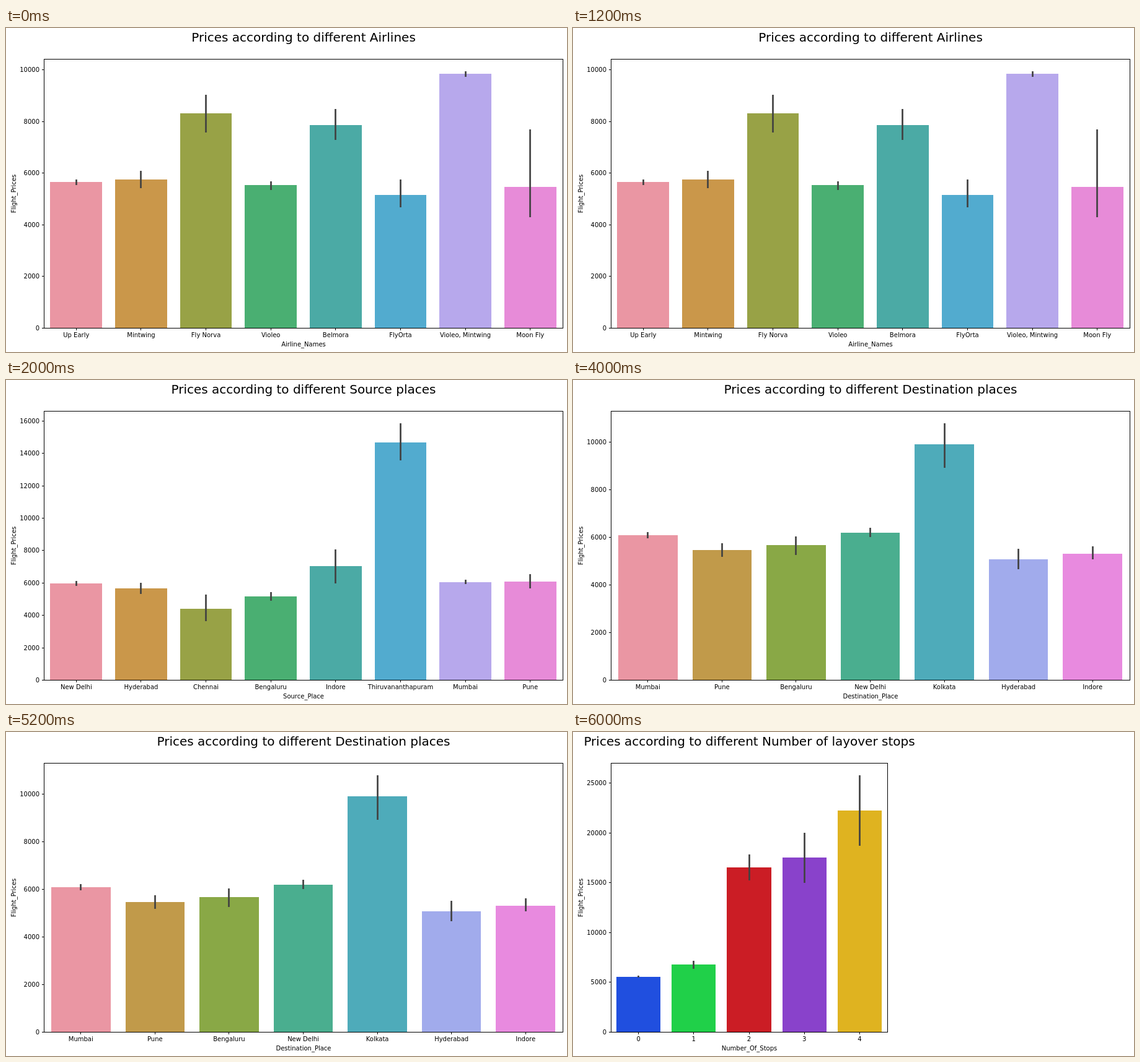
Animation, 905 px wide and 524 px high, one loop 8 s. Source, as an HTML page with a canvas:

```html
<!DOCTYPE html>
<html lang="en">
<head>
<meta charset="utf-8">
<title>Flight prices</title>
<style>
html, body { margin: 0; width: 100%; height: 100%; overflow: hidden; background: #fff; }
canvas { display: block; }
</style>
</head>
<body>
<canvas id="stage" width="905" height="524"></canvas>
<script>
const ctx = document.getElementById('stage').getContext('2d');
const HOLD = 2000, LEFT = 61, TOP = 50, BASE = 485;
const EIGHT = ['#ea96a3', '#ca974a', '#98a246', '#4aaf72', '#4baaa5', '#52abcf', '#b7a8ec', '#e78bd8'];

// unit: pixels per price unit; each bar: label, bar top, error bar top and bottom
const charts = [
  { title: 'Airlines', axis: 'Airline_Names', width: 837, step: 2000, max: 10000, unit: 0.04178, colors: EIGHT,
    bars: [['Up Early', 249, 245, 254], ['Mintwing', 245, 231, 259], ['Fly Norva', 138, 108, 169],
      ['Violeo', 254, 248, 262], ['Belmora', 157, 131, 181], ['FlyOrta', 270, 245, 290],
      ['Violeo, Mintwing', 74, 70, 79], ['Moon Fly', 257, 164, 306]] },
  { title: 'Source places', axis: 'Source_Place', width: 837, step: 2000, max: 16000, unit: 0.02619, colors: EIGHT,
    bars: [['New Delhi', 329, 325, 333], ['Hyderabad', 337, 328, 346], ['Chennai', 370, 347, 390],
      ['Bengaluru', 350, 343, 357], ['Indore', 301, 274, 329], ['Thiruvananthapuram', 101, 70, 130],
      ['Mumbai', 327, 323, 330], ['Pune', 326, 314, 337]] },
  { title: 'Destination places', axis: 'Destination_Place', width: 837, step: 2000, max: 10000, unit: 0.0385,
    colors: ['#ea96a3', '#c19a4a', '#89a846', '#4aae8f', '#4eabba', '#a1abec', '#e88adf'],
    bars: [['Mumbai', 251, 246, 256], ['Pune', 275, 264, 286], ['Bengaluru', 267, 253, 283],
      ['New Delhi', 247, 239, 254], ['Kolkata', 104, 70, 142], ['Hyderabad', 290, 273, 306],
      ['Indore', 281, 269, 290]] },
  { title: 'Number of layover stops', axis: 'Number_Of_Stops', width: 446, step: 5000, max: 25000, unit: 0.01612,
    colors: ['#204fdf', '#20d049', '#cb1d25', '#8942cb', '#dfb320'],
    bars: [['0', 396, 394, 397], ['1', 376, 370, 383], ['2', 219, 198, 240],
      ['3', 203, 163, 244], ['4', 127, 70, 184]] }
];

function text(str, x, y, size = 10, align = 'center') {
  ctx.font = `${size}px "DejaVu Sans", sans-serif`;
  ctx.textAlign = align;
  ctx.fillStyle = '#000';
  ctx.fillText(str, x, y);
}

function line(x1, y1, x2, y2, color = '#000', width = 1) {
  ctx.strokeStyle = color;
  ctx.lineWidth = width;
  ctx.beginPath();
  ctx.moveTo(x1, y1);
  ctx.lineTo(x2, y2);
  ctx.stroke();
}

function draw({ title, axis, width, step, max, unit, colors, bars }) {
  ctx.fillStyle = '#fff';
  ctx.fillRect(0, 0, 905, 524);
  const slot = width / bars.length, middle = LEFT + width / 2 + 0.5;

  bars.forEach(([label, top, high, low], i) => {
    const center = LEFT + slot * (i + 0.5);
    const x1 = Math.round(center - slot * 0.4), x2 = Math.round(center + slot * 0.4);
    const mid = Math.floor(center) + 0.5;
    ctx.fillStyle = colors[i];
    ctx.fillRect(x1, top, x2 - x1, BASE - top);
    line(mid, high, mid, low, '#424242', 2.7);
    line(mid, BASE, mid, BASE + 4);
    text(label, center, 500);
  });

  for (let v = 0; v <= max; v += step) {
    const y = Math.round(BASE - v * unit);
    line(LEFT - 3, y + 0.5, LEFT, y + 0.5);
    text(v, 54, y + 4, 10, 'right');
  }

  ctx.strokeStyle = '#000';
  ctx.lineWidth = 1;
  ctx.strokeRect(LEFT + 0.5, TOP + 0.5, width, BASE - TOP);

  text('Prices according to different ' + title, middle, 22, 20);
  text(axis, middle, 515);
  ctx.save();
  ctx.translate(16, 268);
  ctx.rotate(-Math.PI / 2);
  text('Flight_Prices', 0, 0);
  ctx.restore();
}

const start = performance.now();
function tick() {
  const t = performance.now() - start;
  draw(charts[Math.floor(t / HOLD) % charts.length]);
  requestAnimationFrame(tick);
}
tick();
</script>
</body>
</html>
```
